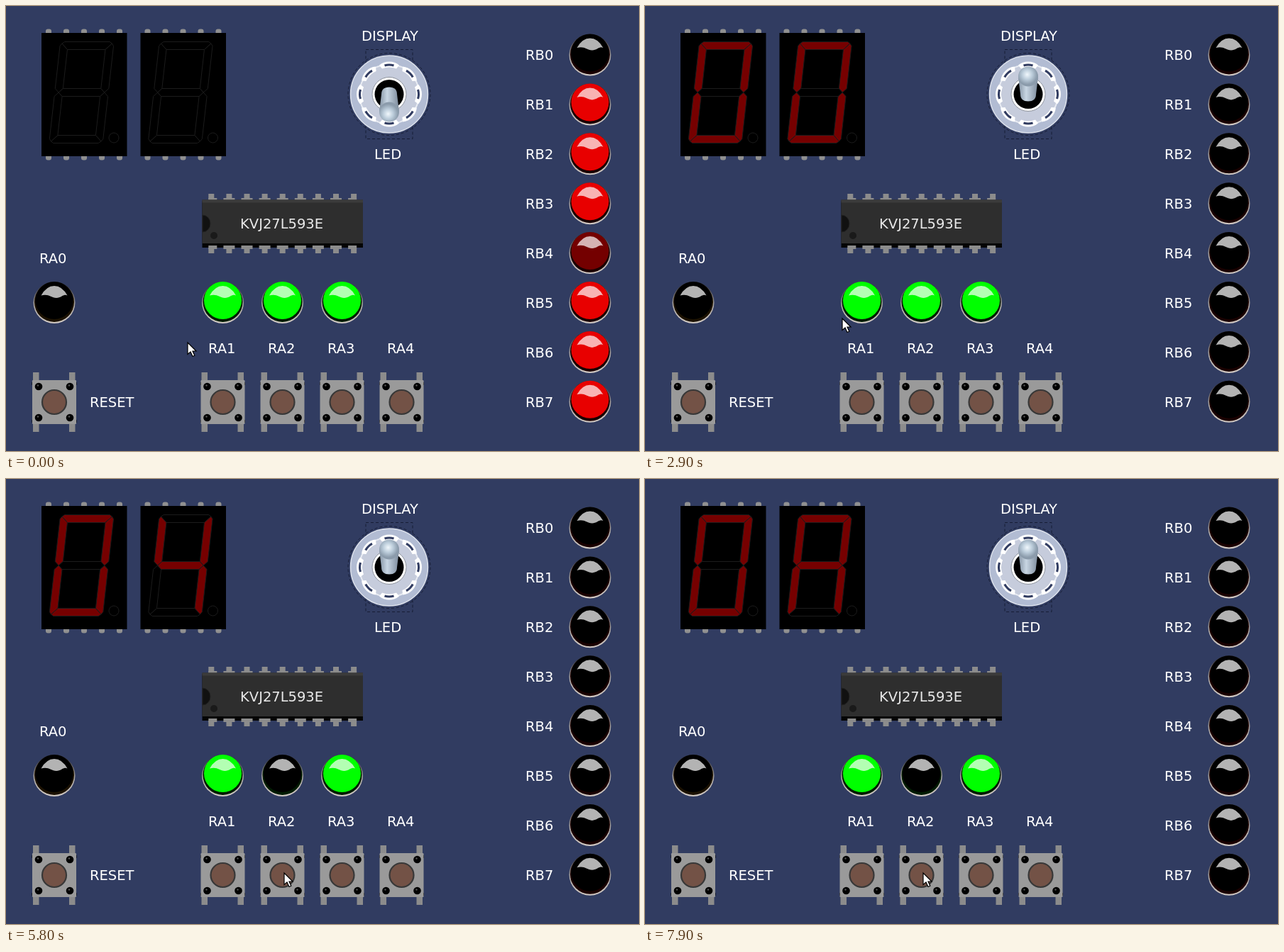
An HTML page that plays this animation: 892x628 px, repeating every 8 s.

```html
<!DOCTYPE html>
<html lang="en">
<head>
<meta charset="utf-8">
<title>Microcontroller board</title>
<style>
html, body { margin: 0; width: 100%; height: 100%; overflow: hidden; background: #313c61; }
svg { display: block; width: 892px; height: 628px; }
text { font: 19.5px "DejaVu Sans", sans-serif; fill: #fff; }
.seg { stroke: #1c1c1c; stroke-linejoin: round; }
</style>
</head>
<body>
<svg id="board" viewBox="0 0 892 628">
  <defs>
    <linearGradient id="rim" x2="0" y2="1">
      <stop offset=".1" stop-color="#34343c"/><stop offset=".55" stop-color="#aaa5a2"/><stop offset="1" stop-color="#d2cac4"/>
    </linearGradient>
    <linearGradient id="stem">
      <stop offset="0" stop-color="#8291a1"/><stop offset=".4" stop-color="#c8d6e3"/><stop offset="1" stop-color="#7b899a"/>
    </linearGradient>
    <radialGradient id="ball" cx=".45" cy=".6">
      <stop offset="0" stop-color="#f0f7fc"/><stop offset=".5" stop-color="#bccddb"/><stop offset="1" stop-color="#8b9bab"/>
    </radialGradient>
    <path id="shine" d="M-18.5-10Q-11-23.5 0-23.5T18.5-10C13-13 10-6.5 3-6.5C-5-7-8-13-18.5-10Z" fill="#fff" opacity=".7"/>
  </defs>
</svg>
<script>
const LOOP = 8000, STEP = 100;
const RED = [232, 0, 0], GREEN = [0, 255, 0], AMBER = [255, 160, 0];
const board = document.getElementById('board');

function add(tag, attrs, parent = board, text = '') {
  const el = document.createElementNS('http://www.w3.org/2000/svg', tag);
  for (const k in attrs) el.setAttribute(k, attrs[k]);
  el.textContent = text;
  parent.appendChild(el);
  return el;
}
const group = (x, y) => add('g', { transform: `translate(${x} ${y})` });
const rect = (x, y, width, height, fill, parent, rx = 0) => add('rect', { x, y, width, height, fill, rx }, parent);
const disc = (cx, cy, r, fill, parent, more) => add('circle', { cx, cy, r, fill, ...more }, parent);
const label = (x, y, text) => add('text', { x, y }, board, text);
const shade = (rgb, k) => `rgb(${rgb.map(c => Math.round(c * k))})`;

// Seven segments: one bar and one side, mirrored, plus the middle bar
const W = 75.5, H = 143, T = 11, MID = H / 2, HALF = T / 2;
const flipX = pts => pts.map(([x, y]) => [W - x, y]);
const flipY = pts => pts.map(([x, y]) => [x, H - y]);
const bar = [[2.5, 2.5], [6, 0], [W - 6, 0], [W - 2.5, 2.5], [W - T, T], [T, T]];
const side = [[2.5, 2.5], [T, T], [T, MID - HALF], [HALF, MID], [0, MID - HALF], [0, 6]];
const top3 = [[HALF, MID], [T, MID - HALF], [W - T, MID - HALF]];
const SEGMENTS = {
  a: bar, b: flipX(side), c: flipX(flipY(side)), d: flipY(bar), e: flipY(side), f: side,
  g: [...top3, ...flipX(flipY(top3))]
};
const DIGITS = ['abcdef', 'bc', 'abged', 'abgcd', 'fgbc', 'afgcd', 'afgedc', 'abc', 'abcdefg', 'abcdfg', 'abcefg'];

function display(x) {
  const g = group(x, 38);
  for (let i = 0; i < 5; i++) rect(6 + i * 25, -5.5, 8, 185, '#909090', g, 3);
  rect(0, 0, 120.5, 174, '#000', g);
  const segs = Object.entries(SEGMENTS).map(([name, pts]) => {
    const points = pts.map(([px, py]) => [26.7 + px - py * .112, 12.5 + py]).join(' ');
    return [name, add('polygon', { points, class: 'seg' }, g)];
  });
  disc(102, 148, 7, 'none', g, { class: 'seg' });
  return n => segs.forEach(([name, el]) =>
    el.setAttribute('fill', n >= 0 && DIGITS[n].includes(name) ? '#760000' : '#000'));
}

function lamp(x, y, rgb) {
  const g = group(x, y);
  disc(0, 0, 29.5, 'url(#rim)', g);
  disc(0, -.5, 28, shade(rgb, .11), g);
  const glow = disc(0, -3, 26.5, '#000', g);
  add('use', { href: '#shine' }, g);
  return k => glow.setAttribute('fill', shade(rgb, k));
}

function button(x) {
  const g = group(x, 559);
  for (const px of [-30, 21]) rect(px, -42, 8.5, 84, '#8c8c8c', g);
  for (const py of [-28, 25]) rect(-31.5, py, 63, 4, '#000', g);
  rect(-31, -31, 62, 62, '#9a9a9a', g, 1);
  for (const px of [-22, 22]) for (const py of [-22, 22]) {
    disc(px, py, 5.3, '#000', g);
    disc(px - 1, py - 1.5, 1.2, '#555', g);
  }
  disc(0, 0, 17, '#735246', g, { stroke: '#383838', 'stroke-width': 2.2 });
}

function chip() {
  const g = group(277, 265);
  const pins = (y, height, wide) => {
    for (let i = 0; i < 9; i++) {
      const left = wide && i ? 8 : 4, right = wide && i < 8 ? 8 : 4;
      rect(12.3 + i * 25.1 - left, y, left + right, height, '#8c8c8c', g);
    }
  };
  pins(0, 84);
  pins(6, 6, true);
  rect(-.5, 10, 226.5, 66, '#050505', g);
  pins(73, 5, true);
  rect(-.5, 8.5, 226.5, 61.5, '#2e2e2e', g);
  rect(-.5, 8.5, 226.5, 4, '#3b3b3b', g);
  add('path', { d: 'M0 30A11 12 0 0 1 0 54Z', fill: '#111', stroke: '#222' }, g);
  disc(16, 59, 5, '#1a1a1a', g);
  label(330, 314, 'KVJ27L593E').style.fill = '#e8e8e8';
}

function toggle() {
  const g = group(540, 124.5);
  const dashed = { stroke: '#171d35', 'stroke-dasharray': '4 3' };
  disc(0, 0, 58, 'none', g, dashed);
  add('rect', { x: -33, y: -63, width: 66, height: 126, fill: 'none', ...dashed }, g);
  disc(0, 0, 54.5, '#b2bcd3', g, { stroke: '#dde2ec', 'stroke-width': 1.5 });
  disc(0, 0, 42, '#c6ccdc', g, { stroke: '#e9ecf3', 'stroke-width': 2 });
  for (let a = 0; a < 360; a += 45) {
    const n = add('g', { transform: `rotate(${a})` }, g);
    add('path', { d: 'M-14-41Q-8-46 0-46T14-41L10-36Q0-40-10-36Z', fill: '#fff' }, n);
    add('path', { d: 'M-7-42Q0-44 7-42L6-39Q0-41-6-39Z', fill: '#313c61' }, n);
  }
  disc(0, 0, 37, '#c6ccdc', g);
  disc(0, 0, 24, '#fff', g, { stroke: '#8f949e' });
  disc(0, 0, 20.5, '#000', g);
  const lever = add('g', {}, g);
  add('path', { d: 'M-11 0Q-11-10 0-10T11 0L14 24H-14Z', fill: 'url(#stem)' }, lever);
  disc(0, 25, 14, 'url(#ball)', lever);
  return up => lever.setAttribute('transform', `scale(1 ${up ? -1 : 1})`);
}

const tens = display(50), ones = display(189.5);
const flip = toggle();
chip();
const ports = [];
for (let i = 0; i < 8; i++) {
  ports.push(lamp(823, 69 + 69.9 * i, RED));
  label(732, 76 + 70 * i, 'RB' + i);
}
lamp(68, 418.5, AMBER)(0);
const greens = [0, 1, 2].map(i => lamp(305.5 + 84 * i, 418.5, GREEN));
button(68);
for (let i = 0; i < 4; i++) {
  button(305.5 + 84 * i);
  label(285 + 84 * i, 490, 'RA' + (i + 1));
}
label(47, 363, 'RA0');
label(118, 566, 'RESET');
label(501, 49, 'DISPLAY');
label(519, 216, 'LED');
const cursor = add('path', {
  d: 'M0 0V16.5L4 13L7 19.5L9.8 18.3L7 12H12Z',
  fill: '#fff', stroke: '#000', 'stroke-width': 1.2
});

// Pointer stops: time, x, y
const PATH = [
  [100, 256, 475], [1000, 568, 116], [1800, 568, 116], [2900, 278, 441],
  [3200, 594, 585], [3700, 306, 556], [4300, 390, 554], [4800, 392, 556]
];

function pointer(t) {
  const i = PATH.findIndex(p => p[0] > t);
  if (i < 1) return PATH[i ? PATH.length - 1 : 0].slice(1);
  const [t0, x0, y0] = PATH[i - 1], [t1, x1, y1] = PATH[i];
  const u = (t - t0) / (t1 - t0), k = u * u * (3 - 2 * u);
  return [x0 + (x1 - x0) * k, y0 + (y1 - y0) * k];
}

// Three clicks a second on RA2, with one beat left out
const BEAT = 1000 / 3, FIRST = 4450, HOLD = 150, REST = 3;
function clicks(t) {
  const beat = Math.floor((t - FIRST) / BEAT);
  const down = beat >= 0 && beat !== REST && t - FIRST - beat * BEAT < HOLD;
  return { down, count: Math.max(0, beat + (beat < REST ? 1 : 0)) };
}

function draw(t) {
  const up = t >= 1800, lit = t >= 1900;
  flip(up);
  // The dim lamp walks down from RB4 and wraps to RB1
  const dim = 1 + (3 + Math.max(0, Math.min(t, 1600) / STEP - 1)) % 7;
  ports.forEach((set, i) => set(up || !i ? 0 : i === dim ? .5 : 1));
  const { down, count } = clicks(t);
  greens.forEach((set, i) => set(i === 1 && down ? 0 : 1));
  tens(lit ? 0 : -1);
  ones(lit ? count : -1);
  cursor.setAttribute('transform', `translate(${pointer(t)})`);
}

const start = performance.now();
function frame() {
  const t = (performance.now() - start) % LOOP;
  draw(Math.floor(t / STEP) * STEP);
  requestAnimationFrame(frame);
}
frame();
</script>
</body>
</html>
```
